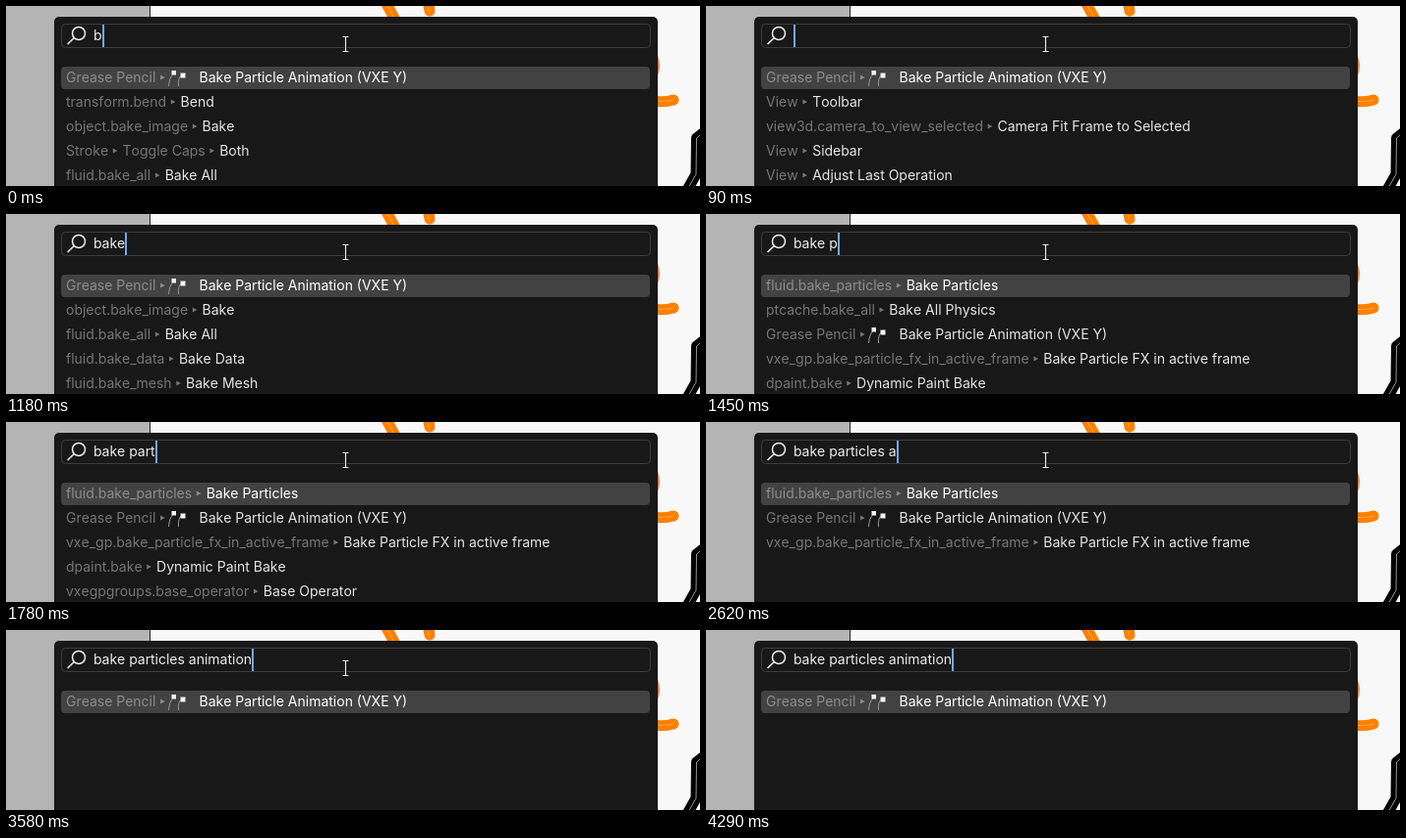
These frames come from a looping animation (706 px wide and 184 px high, 4970 ms). An HTML page:

```html
<!DOCTYPE html>
<html lang="en">
<head>
<meta charset="utf-8">
<title>Operator search</title>
<style>
html, body { margin: 0; width: 706px; height: 184px; overflow: hidden; background: #f8f8f8; }
svg { display: block; }
text { font: 14px Inter, sans-serif; font-kerning: none; white-space: pre; }
</style>
</head>
<body>
<svg width="706" height="184" viewBox="0 0 706 184">
  <rect width="706" height="184" fill="#f8f8f8"/>
  <rect width="147" height="184" fill="#b4b4b4"/>
  <path d="M146.5 0V184" stroke="#222"/>

  <g fill="none" stroke-linecap="round" stroke-linejoin="round">
    <g stroke="#ff8000" stroke-width="11">
      <path d="M386 -4L396 14M429 -6L431 5M655 97Q670 99 679 96"/>
      <path d="M658 53Q661 61 658 69" stroke="#ff7a4a"/>
    </g>
    <path d="M386 -4L396 14M428 -6L430 5M655 96Q670 99 679 96" stroke="#ffa64d"/>
    <path d="M710 129L702.5 135L702 172L693 188" stroke="#000" stroke-width="11"/>
    <path d="M710 129L702.5 135L702 172L693 188" stroke="#bbb" stroke-width=".8"/>
  </g>

  <rect x="49" y="11" width="614" height="200" rx="5" fill="#181818"/>
  <rect x="56.5" y="18.5" width="599" height="24" rx="4" fill="#181818" stroke="#3d3d3d"/>
  <g fill="none" stroke="#eee" stroke-width="1.5" stroke-linecap="round">
    <circle cx="74" cy="28" r="6.5"/>
    <path d="M69.2 32.8L63 38.6"/>
  </g>
  <rect x="56" y="62" width="599" height="23" rx="4" fill="#424242"/>

  <g id="rows"></g>
  <text id="query" x="89" y="35" fill="#eee"></text>
  <rect id="caret" y="19" width="2" height="23" fill="#71a8ff"/>

  <g id="beam" fill="none">
    <path d="M-3 -7.5H3M0 -7.5V7.5M-3 7.5H3" stroke="#111" stroke-width="3"/>
    <path d="M-3 -7.5H3M0 -7.5V7.5M-3 7.5H3" stroke="#eee" stroke-width="1.2"/>
  </g>
  <path id="arrow" d="M.5 .5V15L4 12L6.5 17.5L9 16.5L6.5 11H11Z" fill="#000" stroke="#fff"/>
</svg>

<script>
const LOOP = 4970;
const el = id => document.getElementById(id);
const pen = document.createElement('canvas').getContext('2d');
pen.font = '14px Inter, sans-serif';
pen.fontKerning = 'none';
const widthOf = text => pen.measureText(text).width;

// Each row is a breadcrumb; the last part is the operator's label.
const animation = ['Grease Pencil', 'Bake Particle Animation (VXE Y)'];
const particles = ['fluid.bake_particles', 'Bake Particles'];
const effects = ['vxe_gp.bake_particle_fx_in_active_frame', 'Bake Particle FX in active frame'];
const paint = ['dpaint.bake', 'Dynamic Paint Bake'];
const bake = ['object.bake_image', 'Bake'];
const bakeAll = ['fluid.bake_all', 'Bake All'];

const recent = [
  animation,
  ['View', 'Toolbar'],
  ['view3d.camera_to_view_selected', 'Camera Fit Frame to Selected'],
  ['View', 'Sidebar'],
  ['View', 'Adjust Last Operation']
];
const forB = [animation, ['transform.bend', 'Bend'], bake, ['Stroke', 'Toggle Caps', 'Both'], bakeAll];
const forBake = [animation, bake, bakeAll, ['fluid.bake_data', 'Bake Data'], ['fluid.bake_mesh', 'Bake Mesh']];
const forP = [particles, ['ptcache.bake_all', 'Bake All Physics'], animation, effects, paint];
const forPart = [particles, animation, effects, paint, ['vxegpgroups.base_operator', 'Base Operator']];
const forParti = [particles, animation, effects,
  ['particle.duplicate_particle_system', 'Duplicate Particle System']];
const forPartic = [particles, animation, effects];
const forAn = [animation, particles, effects];

// Start time, typed text, and the results when they change.
const typing = [
  [0, 'b', forB], [90, '', recent], [820, 'b', forB],
  [970, 'ba', forBake], [1060, 'bak'], [1180, 'bake'], [1330, 'bake '],
  [1450, 'bake p', forP], [1510, 'bake pa', forPart], [1630, 'bake par'], [1780, 'bake part'],
  [1870, 'bake parti', forParti], [2020, 'bake partic', forPartic],
  [2230, 'bake particle'], [2380, 'bake particles'], [2530, 'bake particles '],
  [2620, 'bake particles a'], [2740, 'bake particles an', forAn], [2920, 'bake particles ani'],
  [3100, 'bake particles anim', [animation]], [3190, 'bake particles anima'],
  [3250, 'bake particles animat'], [3340, 'bake particles animati'],
  [3490, 'bake particles animatio'], [3580, 'bake particles animation']
];

// Start time, pointer shape, position.
const pointer = [
  [0, 'beam', 345.5, 39], [4140, 'beam', 381, 20], [4170, 'arrow', 346, 50],
  [4200, 'arrow', 301, 88], [4230, 'arrow', 254, 127], [4290, 'none', 0, 0]
];

const latest = (steps, time) => steps.filter(step => step[0] <= time).pop();

const icon = (x, y) => `<g transform="translate(${x} ${y})">
  <path d="M1 4Q1.500 -5 6 -9M11 4Q10 -5 15 -8" fill="none" stroke="#999"/>
  <path d="M4 -12h4.500v4.500h-4.500zM13 -9.500h5v5h-5z" fill="#f4f4f4"/></g>`;

function rowMarkup(parts, index) {
  const y = 78 + index * 25;
  const dim = index ? '#767676' : '#8c8c8c';
  const bright = index ? '#e6e6e6' : '#fff';
  let x = 61;
  let markup = '';
  parts.forEach((part, i) => {
    const last = i === parts.length - 1;
    markup += `<text x="${x}" y="${y}" fill="${last ? bright : dim}">${part}</text>`;
    if (last) return;
    x += widthOf(part);
    markup += `<path d="M${x + 4.7} ${y - 7.6}l4.6 2.6l-4.6 2.6z" fill="${dim}"/>`;
    if (parts === animation) {
      markup += icon(164.5, y);
      x = 196.5;
    } else {
      x += 14.5;
    }
  });
  return markup;
}

let shownRows;
function render(time) {
  const query = latest(typing, time)[1];
  const rows = latest(typing.filter(step => step[2]), time)[2];
  if (rows !== shownRows) {
    el('rows').innerHTML = rows.map(rowMarkup).join('');
    shownRows = rows;
  }
  el('query').textContent = query;
  el('caret').setAttribute('x', Math.round(89 + widthOf(query)));

  const [, shape, x, y] = latest(pointer, time);
  for (const id of ['beam', 'arrow']) {
    el(id).setAttribute('visibility', id === shape ? 'visible' : 'hidden');
    el(id).setAttribute('transform', `translate(${x} ${y})`);
  }
}

const start = performance.now();
function tick() {
  render((performance.now() - start) % LOOP);
  requestAnimationFrame(tick);
}
tick();
</script>
</body>
</html>
```
